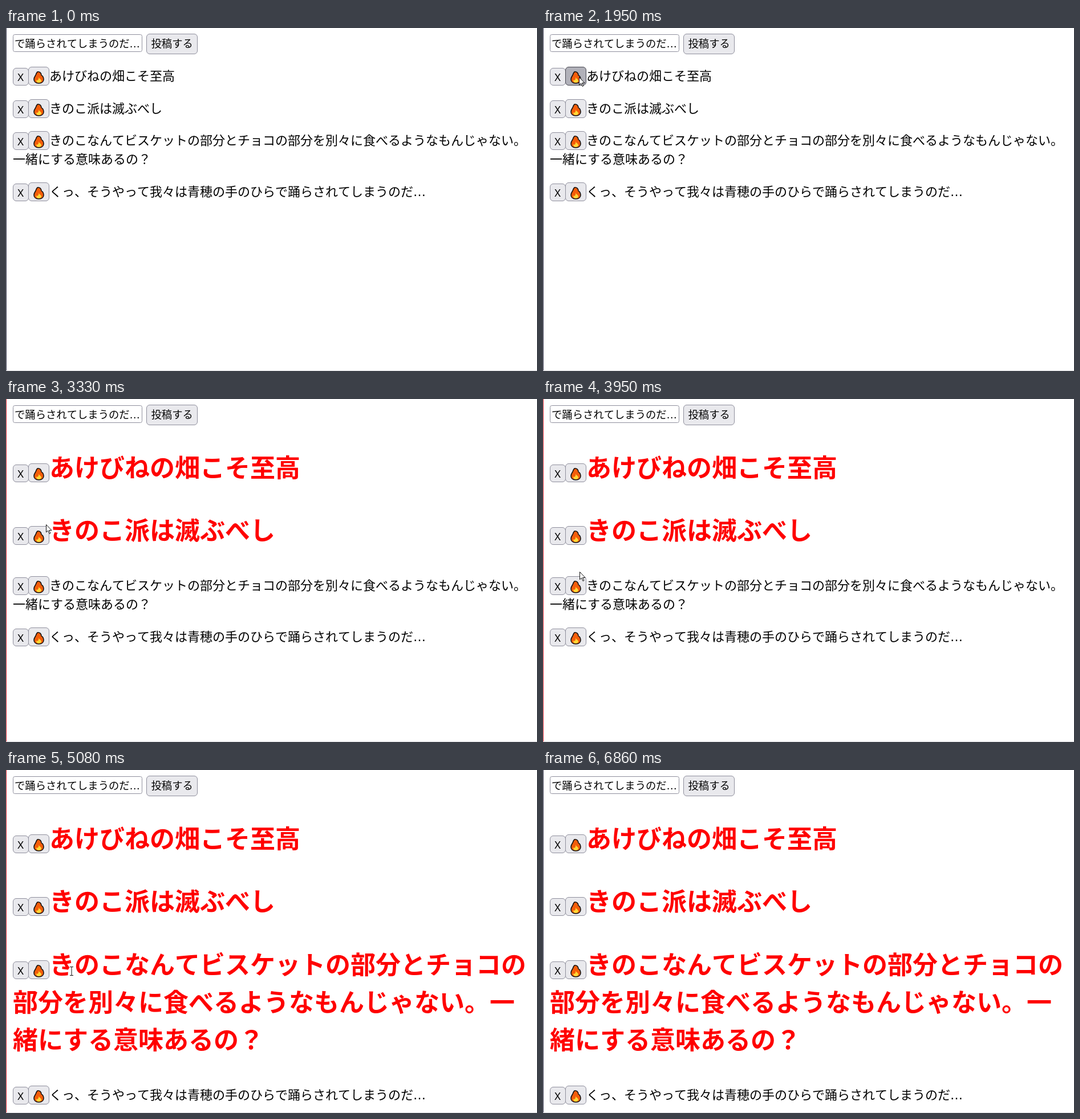
An HTML page that plays this animation: 931x602 px, repeating every 6950 ms.

```html
<!DOCTYPE html>
<html lang="ja">
<head>
<meta charset="utf-8">
<style>
  html, body { margin: 0; width: 100%; height: 100%; overflow: hidden; background: #fff; }
  svg { display: block; width: 931px; height: 602px; }
  text { font: 18.33px "DejaVu Sans", "Noto Sans CJK JP", "Noto Sans CJK", sans-serif; font-kerning: none; white-space: pre; }
  .close { font-family: "Noto Sans", sans-serif; text-anchor: middle; }
  .post { font-size: 22px; }
  .burning { font-size: 44px; font-weight: bold; fill: #f00; }
  .box { fill: #e9e9ed; stroke: #8f8f9d; }
  .field { fill: #fff; }
  .hover { fill: #d0d0d7; stroke: #676774; }
  .pressed { fill: #b1b1b9; stroke: #484851; }
</style>
</head>
<body>
<svg viewBox="0 0 931 602">
  <defs>
    <g id="flame">
      <path d="M55 -16C59 -17 62 -14 62 -10C64 -10 66 -6 66 -3C66 1 63 4 57.5 4C52 4 49 1 49 -3C49 -8 53 -10 53 -13Z" fill="#f45d0a" stroke="#111" stroke-width="1.6" stroke-linejoin="round"/>
      <path d="M57 -7C58 -4 62 -3 62 0Q61 3 57.5 3Q53 3 53 -2L55 -1Q58 -3 57 -7Z" fill="#ffd936"/>
    </g>
    <path id="arrow" d="M.5 .5V14L3.5 11L6 16.5L8 15.5L5.5 10.5H10Z" fill="#fff" stroke="#111"/>
    <path id="beam" d="M-3 -7.5H3M-3 7.5H3M0 -7.5V7.5" fill="none" stroke="#111"/>
  </defs>
  <rect id="edge" width="1" height="601"/>
  <rect y="601" width="931" height="1" fill="#dcdce0"/>
  <rect class="box field" x="12.5" y="11.5" width="226" height="30" rx="3"/>
  <text x="15" y="33.5">で踊らされてしまうのだ…</text>
  <rect class="box" x="246.5" y="10.5" width="89" height="35" rx="5.5"/>
  <text x="254.5" y="33.5">投稿する</text>
  <g id="posts"></g>
  <use id="cursor"/>
</svg>
<script>
const LOOP = 6950, TICKS_PER_MS = 15 / 1000, LAST_TICK = 103;
const LEFT = 12, RIGHT = 919, TEXT_X = 76, TOP = 46.4, FONT_SIZE = 22, BUTTON_ASCENT = 25;
const PRESS_TICKS = 2;
const $ = id => document.getElementById(id);

const posts = [
  "あけびねの畑こそ至高",
  "きのこ派は滅ぶべし",
  "きのこなんてビスケットの部分とチョコの部分を別々に食べるようなもんじゃない。一緒にする意味あるの？",
  "くっ、そうやって我々は青穂の手のひらで踊らされてしまうのだ…"
];

// Where the pointer is at each tick; it rests at a stop with a press until the release
const stops = [
  { tick: 2, x: 874, y: 590 },
  { tick: 12, x: 301, y: 279 },
  { tick: 18, x: 126, y: 111 },
  { tick: 23, x: 63, y: 86, press: 28 },
  { tick: 38, x: 67, y: 158 },
  { tick: 43, x: 70, y: 220, press: 48 },
  { tick: 62, x: 62, y: 331, press: 67 },
  { tick: 76, x: 115, y: 353 },
  { tick: 82, x: 473, y: 401 },
  { tick: 88, x: 778, y: 504 },
  { tick: 94, x: 890, y: 610 }
];
const presses = stops.flatMap(stop => stop.press ?? []);

function pointerAt(tick) {
  const i = stops.findIndex(stop => stop.tick > tick);
  if (i < 1) return { x: -50, y: -50 };
  const from = stops[i - 1], to = stops[i];
  const start = from.press ? from.press + PRESS_TICKS : from.tick;
  const u = Math.max(0, (tick - start) / (to.tick - start));
  const mix = axis => Math.round(from[axis] + (to[axis] - from[axis]) * u);
  return { x: mix("x"), y: mix("y") };
}

function wrap(text, size) {
  const lines = [];
  for (let x = TEXT_X; text; x = LEFT) {
    const count = Math.floor((RIGHT - x) / size);
    lines.push({ x, text: text.slice(0, count) });
    text = text.slice(count);
  }
  return lines;
}

// Stack the posts like paragraphs with collapsing margins of 1em
function layout(burning) {
  let bottom = TOP, lastMargin = 0;
  return posts.map((text, i) => {
    const hot = i < burning, size = hot ? FONT_SIZE * 2 : FONT_SIZE;
    const baseline = bottom + Math.max(lastMargin, size) + Math.max(BUTTON_ASCENT, size * 1.08);
    const y = Math.round(baseline), lineHeight = size * 1.5;
    const lines = wrap(text, size).map((line, n) => ({ ...line, y: y - 1 + n * lineHeight }));
    bottom = baseline + (lines.length - 1) * lineHeight + size * 0.43;
    lastMargin = size;
    return { hot, size, y, lines };
  });
}

const isOnButton = ({ x, y }, post) =>
  x >= 40 && x < TEXT_X && y >= post.y - BUTTON_ASCENT && y < post.y + 8;

const isOnText = ({ x, y }, { lines, size }) => lines.some(line =>
  x >= line.x && x < line.x + line.text.length * size &&
  y > line.y - size && y < line.y + size * 0.4);

function postMarkup({ y, hot, lines }, buttonState) {
  return `<rect class="box" x="12.5" y="${y - 22.5}" width="27" height="30" rx="5.5"/>
    <text class="close" x="25.5" y="${y - 0.5}">X</text>
    <rect class="box ${buttonState}" x="39.5" y="${y - 24.5}" width="36" height="32" rx="5.5"/>
    <use href="#flame" y="${y}"/>` +
    lines.map(l => `<text class="post ${hot ? "burning" : ""}" x="${l.x}" y="${l.y}">${l.text}</text>`).join("");
}

function render(tick) {
  const burning = presses.filter(p => tick >= p + PRESS_TICKS).length;
  const pressed = presses.findIndex(p => tick >= p && tick < p + PRESS_TICKS);
  const rows = layout(burning);
  // Buttons react to the pointer one tick late
  const pointer = pointerAt(tick), previous = pointerAt(tick - 1);

  $("posts").innerHTML = rows.map((post, i) => postMarkup(post,
    i === pressed ? "pressed" : isOnButton(previous, post) ? "hover" : "")).join("");
  $("edge").setAttribute("fill", burning && tick < LAST_TICK ? "#e0303c" : "#45455a");
  const shape = rows.some(post => isOnText(pointer, post)) ? "beam" : "arrow";
  $("cursor").setAttribute("href", "#" + shape);
  $("cursor").setAttribute("transform", `translate(${pointer.x} ${pointer.y})`);
}

let shownTick = -1;
function frame() {
  const tick = Math.floor((performance.now() % LOOP + 11) * TICKS_PER_MS);
  if (tick !== shownTick) render(shownTick = tick);
  requestAnimationFrame(frame);
}
frame();
</script>
</body>
</html>
```
